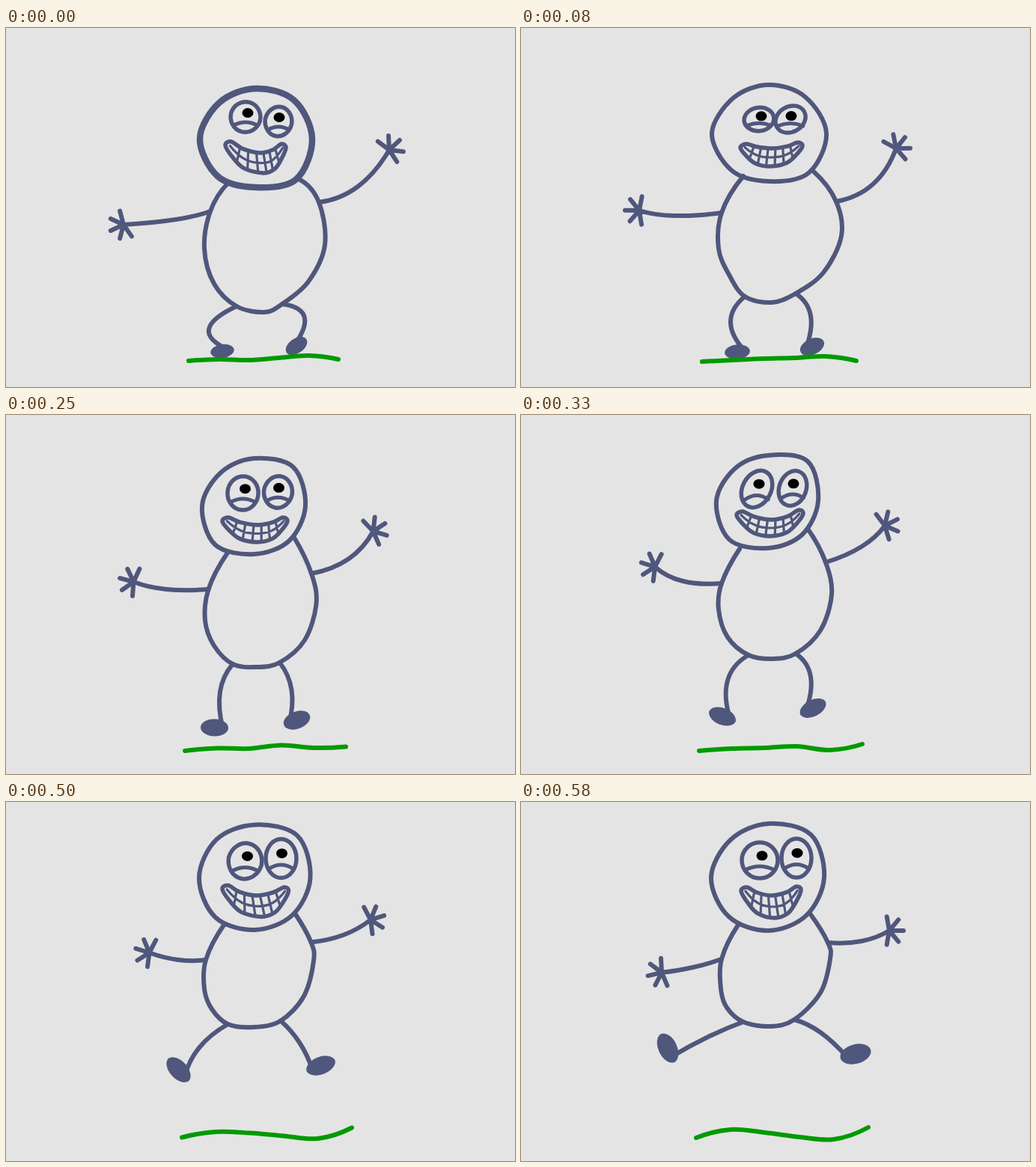
Recreate the animation shown at these times as an HTML page. Size 680x480 px, loop 660 ms.

```html
<!DOCTYPE html>
<html lang="en">
<head>
<meta charset="utf-8">
<title>Jumping figure</title>
<style>
html, body { margin: 0; width: 100%; height: 100%; overflow: hidden; background: #e4e4e4; }
svg { display: block; width: 100vw; height: 100vh; }
path { fill: none; stroke: #50577c; stroke-width: 6; stroke-linecap: round; stroke-linejoin: round; }
</style>
</head>
<body>
<svg id="stage" viewBox="0 0 680 480"></svg>
<script>
// Key poses of the jump:
//   head: centre, then radii every 45 degrees      body: left neck round to right neck
//   arm: elbow, hand, hand angle                   leg: knee, foot, foot tilt
//   eye: centre, radii, tilt                       mouth: left, top, right, bottom
//   ground: evenly spaced heights
const poses = [
  {
    head: [333, 148, 76, 77, 65, 71, 74, 68, 67, 73],
    body: [297, 207, 273, 245, 265, 295, 278, 342, 308, 372, 345, 380, 369, 369, 404, 339, 426, 290, 418, 233, 391, 202],
    armL: [227, 256, 157, 263, 155], armR: [470, 212, 512, 163, 317],
    legL: [271, 403, 289, 432, -8], legR: [399, 388, 388, 425, -35],
    eyeL: [320, 119, 20, 21, 15], eyeR: [364, 125, 18, 21, 10],
    mouth: [293, 157, 340, 167, 374, 160, 344, 194],
    ground: [445, 443, 444, 441, 438, 443]
  },
  {
    head: [331, 141, 77, 75, 64, 70, 76, 67, 65, 69],
    body: [297, 198, 268, 247, 264, 295, 278, 330, 299, 359, 335, 367, 367, 355, 404, 327, 428, 278, 421, 232, 391, 192],
    armL: [205, 251, 158, 244, 181], armR: [470, 209, 501, 161, 309],
    legL: [280, 393, 289, 433, -5], legR: [387, 385, 389, 426, -25],
    eyeL: [318, 122, 20, 16, -8], eyeR: [360, 122, 21, 17, -30],
    mouth: [293, 160, 335, 161, 376, 158, 333, 185],
    ground: [446, 444, 442, 441, 439, 445]
  },
  {
    head: [333, 128, 70, 68, 66, 74, 70, 64, 66, 72],
    body: [299, 191, 273, 241, 268, 290, 280, 320, 302, 345, 333, 348, 364, 343, 398, 314, 414, 265, 409, 227, 386, 174],
    armL: [212, 244, 162, 243, 192], armR: [460, 209, 495, 163, 320],
    legL: [296, 385, 288, 433, -18], legR: [376, 385, 387, 424, -15],
    eyeL: [318, 110, 22, 19, -20], eyeR: [364, 108, 20, 20, 0],
    mouth: [290, 150, 338, 154, 375, 152, 338, 178],
    ground: [449, 445, 447, 440, 442, 447]
  },
  {
    head: [330, 115, 67, 64, 63, 73, 69, 62, 61, 75],
    body: [292, 179, 268, 225, 264, 260, 276, 297, 304, 321, 336, 326, 367, 319, 400, 288, 415, 240, 407, 197, 383, 152],
    armL: [216, 222, 179, 203, 197], armR: [455, 176, 486, 148, 333],
    legL: [276, 355, 269, 403, 22], legR: [387, 350, 390, 392, -27],
    eyeL: [315, 99, 19, 26, 28], eyeR: [363, 98, 18, 24, 20],
    mouth: [288, 134, 335, 140, 377, 132, 333, 162],
    ground: [449, 446, 445, 443, 448, 440]
  },
  {
    head: [335, 102, 73, 69, 68, 75, 73, 74, 70, 79],
    body: [291, 166, 266, 212, 263, 250, 275, 279, 296, 300, 330, 302, 369, 294, 396, 264, 409, 215, 405, 187, 386, 149],
    armL: [230, 201, 195, 175, 228], armR: [448, 169, 482, 143, 325],
    legL: [267, 342, 265, 387, 30], legR: [384, 335, 394, 368, -27],
    eyeL: [320, 80, 21, 27, 28], eyeR: [367, 76, 21, 26, 0],
    mouth: [284, 114, 333, 125, 381, 120, 342, 152],
    ground: [448, 444, 443, 445, 449, 436]
  },
  {
    head: [330, 101, 75, 72, 71, 74, 76, 71, 72, 81],
    body: [291, 163, 268, 210, 267, 250, 275, 275, 297, 294, 333, 300, 365, 291, 400, 255, 413, 210, 410, 188, 386, 149],
    armL: [230, 221, 188, 228, 167], armR: [455, 186, 492, 172, 360],
    legL: [250, 314, 196, 329, 65], legR: [400, 308, 447, 337, -15],
    eyeL: [319, 78, 24, 24, 0], eyeR: [368, 75, 20, 26, 0],
    mouth: [294, 119, 335, 125, 374, 118, 339, 155],
    ground: [449, 438, 442, 448, 451, 435]
  }
];

// [start time, pose]; a half means midway between two poses
const steps = [[0, 0], [80, 1], [170, 2], [250, 2.5], [330, 3], [420, 4], [500, 4.5], [580, 5]];
const LOOP = 660;

const mix = (a, b, k) => a.map((v, i) => v + (b[i] - v) * k);
const pairs = a => Array.from({ length: a.length / 2 }, (_, i) => [a[2 * i], a[2 * i + 1]]);
const fmt = p => p.map(v => v.toFixed(1)).join(',');
const line = (a, b) => `M${fmt(a)}L${fmt(b)}`;
const polar = ([x, y], r, deg) => {
  const a = deg * Math.PI / 180;
  return [x + r * Math.cos(a), y + r * Math.sin(a)];
};

// Smooth curve through points; open ends continue as a parabola.
function curve(pts, closed) {
  const n = pts.length;
  const beyond = (a, b, c) => a.map((v, j) => 3 * v - 3 * b[j] + c[j]);
  const all = closed
    ? [pts[n - 1], ...pts, pts[0], pts[1]]
    : [beyond(...pts.slice(0, 3)), ...pts, beyond(...pts.slice(-3).reverse())];
  let d = 'M' + fmt(pts[0]);
  for (let i = 0; i + 3 < all.length; i++) {
    const [a, b, c, e] = all.slice(i, i + 4);
    const c1 = b.map((v, j) => v + (c[j] - a[j]) / 6);
    const c2 = c.map((v, j) => v - (e[j] - b[j]) / 6);
    d += `C${fmt(c1)} ${fmt(c2)} ${fmt(c)}`;
  }
  return d + (closed ? 'Z' : '');
}

function oval([x, y, rx, ry, tilt]) {
  const a = polar([x, y], rx, tilt), b = polar([x, y], -rx, tilt);
  const arc = p => `A${rx} ${ry} ${tilt} 0 1 ${fmt(p)}`;
  return 'M' + fmt(b) + arc(a) + arc(b) + 'Z';
}

const svg = document.getElementById('stage');
const paths = {};
function draw(name, d, style = '') {
  let p = paths[name];
  if (!p) {
    p = paths[name] = document.createElementNS(svg.namespaceURI, 'path');
    svg.append(p);
  }
  p.style.cssText = style;
  p.setAttribute('d', d);
}

function drawArm(side, joint, [ex, ey, hx, hy, angle]) {
  const palm = [hx, hy];
  const fingers = [-2, -1, 0, 1, 2].map(i => line(palm, polar(palm, 19, angle + 50 * i)));
  draw('arm' + side, curve([joint, [ex, ey], palm]) + fingers.join(''));
}

function drawLeg(side, hip, [kx, ky, fx, fy, tilt], size) {
  const inward = side === 'L' ? 1 : -1;
  const ankle = polar([fx, fy], inward * size * 0.6, tilt);
  draw('leg' + side, curve([hip, [kx, ky], ankle]));
  draw('foot' + side, oval([fx, fy, size, size * 0.62, tilt]), 'fill:#50577c;stroke:none');
}

function drawEye(side, eye) {
  const [x, y, rx, ry] = eye;
  const lid = [-1, 0, 1].map(i => [x + i * rx * 0.8, y + ry * (i ? 0.53 : 0.33)]);
  draw('lid' + side, curve(lid), 'stroke-width:5');
  draw('eye' + side, oval(eye), 'stroke-width:5.5');
  const look = side === 'L' ? 3 : 1;
  draw('pupil' + side, oval([x + look, y - ry * 0.26, 7.5, 6.5, 0]), 'fill:#000;stroke:none');
}

function drawMouth(mouth) {
  const [left, top, right, bottom] = pairs(mouth);
  // u runs from -1 at the left corner to 1 at the right one
  const edge = (l, m, r, power) => u => {
    const c = u < 0 ? l : r, k = Math.abs(u);
    return [m[0] + (c[0] - m[0]) * k, m[1] + (c[1] - m[1]) * k ** power];
  };
  const upper = edge([left[0] + 8, left[1] - 5], top, [right[0] - 6, right[1] - 5], 2);
  const lower = edge(left, bottom, right, 2.6);
  const middle = u => mix(upper(u), lower(u), 0.5);

  let teeth = curve([-0.95, -0.5, 0, 0.5, 0.95].map(middle));
  for (let u = -0.7; u < 0.8; u += 0.28) teeth += line(upper(u), lower(u));
  draw('teeth', teeth, 'stroke-width:3.2');
  const lips = [left, ...[-1, -0.6, 0, 0.6, 1].map(upper), right, ...[0.8, 0.5, 0, -0.5, -0.8].map(lower)];
  draw('mouth', curve(lips, true), 'stroke-width:5.5');
}

function render(step) {
  const i = step | 0, a = poses[i], b = poses[Math.min(i + 1, poses.length - 1)];
  const p = {};
  for (const k in a) p[k] = mix(a[k], b[k], step - i);

  const body = pairs(p.body);
  const [cx, cy, ...radii] = p.head;
  draw('body', curve(body));
  draw('head', curve(radii.map((r, j) => polar([cx, cy], r, j * 45)), true),
    `stroke-width:${6 + 2.5 * Math.max(0, 1 - step)}`);
  drawArm('L', body[1], p.armL);
  drawArm('R', body[9], p.armR);
  drawLeg('L', body[4], p.legL, 16 + step);
  drawLeg('R', body[6], p.legR, 16 + step);
  drawEye('L', p.eyeL);
  drawEye('R', p.eyeR);
  drawMouth(p.mouth);

  const x0 = 244 - 2 * step, x1 = 444 + 4 * step;
  draw('ground', curve(p.ground.map((y, j) => [x0 + (x1 - x0) * j / 5, y])), 'stroke:#009a00');
}

const start = performance.now();
function tick() {
  const t = (performance.now() - start) % LOOP;
  render(steps.filter(s => s[0] <= t).pop()[1]);
  requestAnimationFrame(tick);
}
tick();
</script>
</body>
</html>
```
